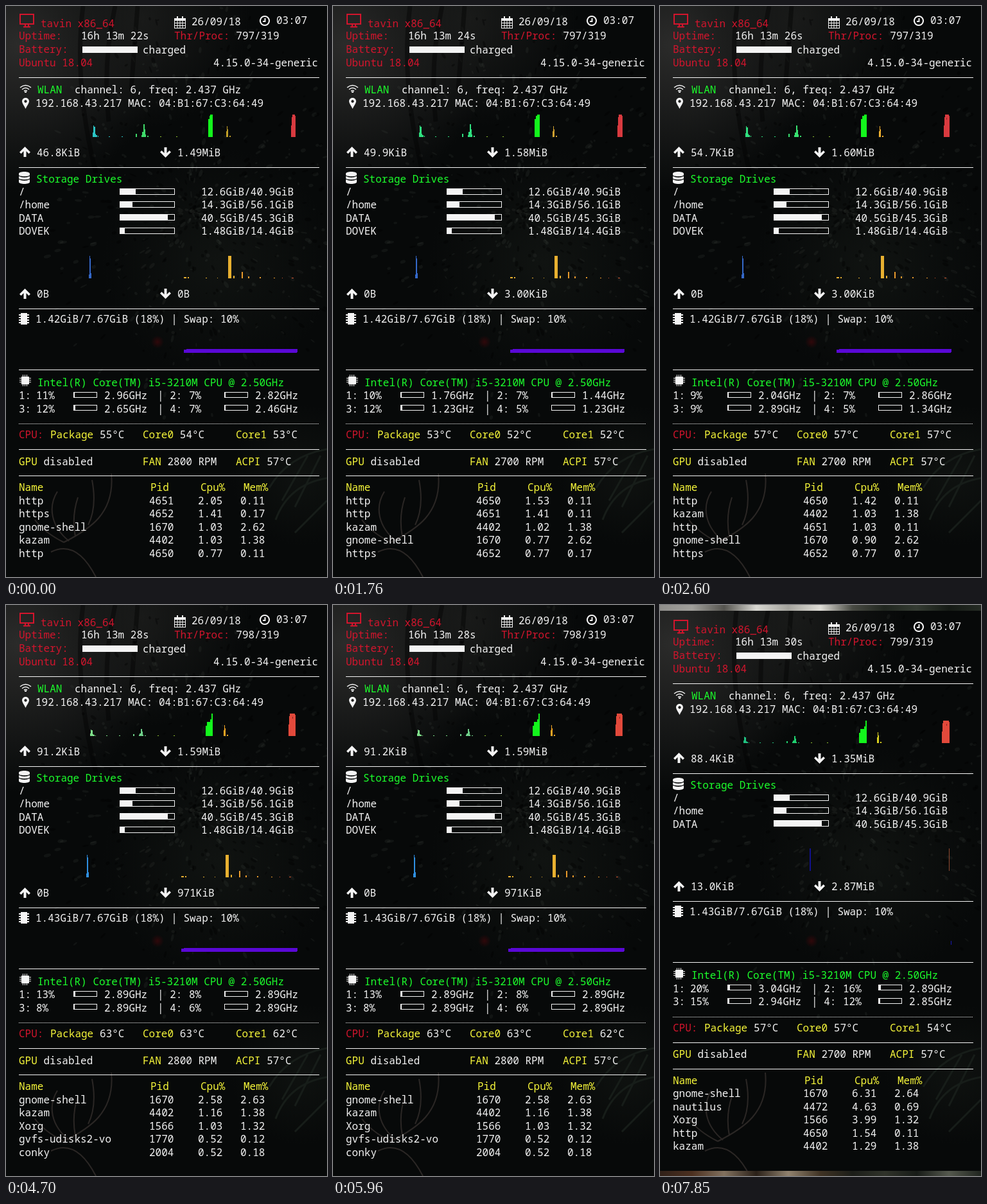
These frames come from a looping animation (500 px wide and 889 px high, 8000 ms). An HTML page with a canvas:

```html
<!DOCTYPE html>
<html lang="en">
<head>
<meta charset="utf-8">
<title>System monitor</title>
<style>
html, body { margin: 0; width: 100%; height: 100%; overflow: hidden; background: #080909; }
canvas { display: block; }
</style>
</head>
<body>
<canvas id="stage" width="500" height="889"></canvas>
<script>
const W = 500, H = 889, LOOP = 8000;
const WHITE = '#f4f4f4', RED = '#d3152d', GREEN = '#1cff2c', YELLOW = '#f7f73a';
const stage = document.getElementById('stage');
let c = stage.getContext('2d');
let shift = 0; // vertical offset of the current block

// cores: "load frequency"; temps: package, core 0, core 1
const states = [
  { at: 0, up: '16h 13m 22s', thr: '797/319', net: ['46.8KiB', '1.49MiB'], io: ['0B', '0B'], mem: '1.42',
    cores: ['11 2.96', '7 2.82', '12 2.65', '7 2.46'], temps: [55, 54, 53], fan: 2800,
    top: ['http 4651 2.05 0.11', 'https 4652 1.41 0.17', 'gnome-shell 1670 1.03 2.62', 'kazam 4402 1.03 1.38', 'http 4650 0.77 0.11'],
    hues: ['#2bc4c4', '#3fd96a', '#c2a028'], scale: 1 },
  { at: 500, up: '16h 13m 24s', thr: '797/319', net: ['49.9KiB', '1.58MiB'], io: ['0B', '3.00KiB'], mem: '1.42',
    cores: ['10 1.76', '7 1.44', '12 1.23', '5 1.23'], temps: [53, 52, 52], fan: 2700,
    top: ['http 4650 1.53 0.11', 'http 4651 1.41 0.11', 'kazam 4402 1.02 1.38', 'gnome-shell 1670 0.77 2.62', 'https 4652 0.77 0.17'],
    hues: ['#2fe07f', '#2fe07f', '#cfa030'], scale: 1 },
  { at: 2600, up: '16h 13m 26s', thr: '797/319', net: ['54.7KiB', '1.60MiB'], io: ['0B', '3.00KiB'], mem: '1.42',
    cores: ['9 2.04', '7 2.86', '9 2.89', '5 1.34'], temps: [57, 57, 57], fan: 2700,
    top: ['http 4650 1.42 0.11', 'kazam 4402 1.03 1.38', 'http 4651 1.03 0.11', 'gnome-shell 1670 0.90 2.62', 'https 4652 0.77 0.17'],
    hues: ['#2fe07f', '#38e070', '#eeb030'], scale: .92 },
  { at: 4700, up: '16h 13m 28s', thr: '798/319', net: ['91.2KiB', '1.59MiB'], io: ['0B', '971KiB'], mem: '1.43',
    cores: ['13 2.89', '8 2.89', '8 2.89', '6 2.89'], temps: [63, 63, 62], fan: 2800,
    top: ['gnome-shell 1670 2.58 2.63', 'kazam 4402 1.16 1.38', 'Xorg 1566 1.03 1.32', 'gvfs-udisks2-vo 1770 0.52 0.12', 'conky 2004 0.52 0.18'],
    hues: ['#7fe08a', '#6fd08a', '#f5a623'], scale: .55 },
  { at: 6800, up: '16h 13m 30s', thr: '799/319', net: ['88.4KiB', '1.35MiB'], io: ['13.0KiB', '2.87MiB'], mem: '1.43',
    cores: ['20 3.04', '16 2.89', '15 2.94', '12 2.85'], temps: [57, 57, 54], fan: 2700,
    top: ['gnome-shell 1670 6.31 2.64', 'nautilus 4472 4.63 0.69', 'Xorg 1566 3.99 1.32', 'http 4650 1.54 0.11', 'kazam 4402 1.29 1.38'],
    hues: ['#20c080', '#20d070', '#d8d020'], scale: .55, unmounted: true }
];
const drives = [['/', 25, '12.6GiB/40.9GiB'], ['/home', 20, '14.3GiB/56.1GiB'],
  ['DATA', 75, '40.5GiB/45.3GiB'], ['DOVEK', 8, '1.48GiB/14.4GiB']];

function rect(x, y, w, h, color = WHITE) {
  c.fillStyle = color;
  c.fillRect(x, Math.round(y + shift), w, h);
}
// y is the middle of the capitals
function text(s, x, y, color = WHITE) {
  c.fillStyle = color;
  c.fillText(s, x, Math.round(y + shift + 5.5));
}
function pair(label, value, x, y, color = YELLOW) {
  text(label, x, y, color);
  text(value, x + (label.length + 1) * 9.63, y);
}
function rule(y) { rect(20, y, 468, 1); }
function gauge(x, y, w, h, fill) {
  c.strokeStyle = WHITE;
  c.lineWidth = 1;
  c.strokeRect(x + .5, Math.round(y + shift) + .5, w - 1, h - 1);
  rect(x, y, fill, h);
}
function bars(list, base, color, dx = 0, scale = 1) {
  for (const [x, w, h] of list) {
    const tall = Math.max(1, Math.round(h * scale));
    rect(Math.round(x + dx), base - tall, w, tall, color);
  }
}
function icon(d, x, y, color = WHITE, line = 0) {
  c.save();
  c.translate(x, Math.round(y + shift));
  c.fillStyle = c.strokeStyle = color;
  c.lineWidth = line;
  const p = new Path2D(d);
  if (line) c.stroke(p); else c.fill(p, 'evenodd');
  c.restore();
}

const arrow = 'M8.5 0L17 8.5L14.5 11L10.5 7V16H6.5V7L2.5 11L0 8.5Z';
const arrowDown = 'M8.5 16L17 7.5L14.5 5L10.5 9V0H6.5V9L2.5 5L0 7.5Z';

function header(s) {
  icon('M1 1H22V16H1ZM9 16V20M14 16V20M6 20.5H17', 21, 12, RED, 2);
  text('tavin x86_64', 54, 27, RED);
  icon('M0 3H4V0H6V3H12V0H14V3H18V19H0ZM1 7V18H17V7Z', 262, 16);
  icon('M1 10.5H17M1 14.5H17M5 7V18M9 7V18M13 7V18', 262, 16, WHITE, 1);
  text('26/09/18', 289, 24);
  icon('M8 1A7 7 0 1 1 7.99 1M8.5 4V9H5', 395, 15, WHITE, 2);
  text('03:07', 421, 22);
  text('Uptime:', 20, 46, RED);
  text(s.up, 117, 46);
  pair('Thr/Proc:', s.thr, 262, 46, RED);
  text('Battery:', 20, 67, RED);
  rect(119, 63, 86, 10);
  text('charged', 213, 68);
  text('Ubuntu 18.04', 20, 88, RED);
  text('4.15.0-34-generic', 323, 88);
  rule(111);
}

function wlan(s, i) {
  icon('M1 5Q9.5 -2 18 5M4 8Q9.5 3 15 8M7 10.5Q9.5 8.5 12 10.5', 21, 122, WHITE, 1.5);
  rect(29, 133, 3, 2);
  text('WLAN', 49, 130, GREEN);
  text('channel: 6, freq: 2.437 GHz', 107, 130);
  icon('M5.5 0C9 0 11 2.5 11 5.5C11 8 7.5 13 5.5 17C3.5 13 0 8 0 5.5C0 2.5 2 0 5.5 0ZM5.5 3.3A2.2 2.2 0 1 0 5.51 3.3Z', 25, 143);
  text('192.168.43.217 MAC: 04:B1:67:C3:64:49', 46, 151);

  const dx = -1.25 * i, base = 204, [left, mid, late] = s.hues;
  bars([[135, 1, 7], [136, 1, 18], [137, 2, 16], [139, 1, 5], [140, 2, 3], [143, 1, 2], [160, 2, 1], [180, 2, 1]], base, left, dx, s.scale);
  bars([[202, 2, 5], [211, 1, 3], [212, 2, 8], [214, 2, 20], [216, 1, 12], [217, 1, 4], [220, 2, 2]], base, mid, dx, s.scale);
  bars([[240, 2, 1], [265, 2, 1]], base, '#8fbf30', dx);
  bars([[343, 1, 9], [344, 1, 17], [345, 1, 12], [348, 2, 2]], base, late, dx);

  // the newest samples grow leftwards from a fixed edge
  const edge = Math.round(315 + dx);
  const steps = i < 3 ? [28, 33, 35] : [16, 22, 35];
  bars([[edge, 2, steps[0]], [edge + 2, 316 - edge, steps[1]],
    [318, 2, i < 3 ? 35 : 26], [320, 2, steps[2]]], base, '#13f51c');
  const redEdge = Math.round(444 + dx);
  bars([[redEdge, 1, 18], [redEdge + 1, 1, 31], [redEdge + 2, 448 - redEdge, 35], [450, 1, 33]], base, i < 3 ? '#d83a3f' : '#e2493b');
  if (i > 1) bars([[446, 1, 3]], 177, '#8d2723');

  icon(arrow, 21, 219);
  text(s.net[0], 48, 228);
  icon(arrowDown, 240, 220);
  text(s.net[1], 267, 228);
  rule(251);
}

function storage(s) {
  icon('M0 3C0 -1 17 -1 17 3V5C17 8 0 8 0 5ZM0 7Q8.5 11 17 7V10C17 13 0 13 0 10ZM0 12Q8.5 16 17 12V16C17 20 0 20 0 16Z', 20, 258);
  text('Storage Drives', 47, 269, GREEN);
  drives.slice(0, s.unmounted ? 3 : 4).forEach(([name, fill, size], k) => {
    const y = 289.5 + 20.4 * k;
    text(name, 20, y);
    gauge(177, y - 6, 86, 10, fill);
    text(size, 304, y);
  });
}

function diskAndMemory(s, i) {
  const dx = -1.25 * i, base = 424;
  if (s.unmounted) {
    bars([[233, 2, 35]], base, '#11118c');
    bars([[450, 1, 35]], base, '#8e4930');
    rect(453, 533, 1, 6, '#1818b0');
  } else {
    bars([[129, 1, 6], [130, 1, 35], [131, 1, 31], [132, 1, 8]], base, i < 3 ? '#3468c8' : '#2f8fe0', dx);
    bars([[277, 4, 2], [283, 2, 2], [311, 2, 1], [329, 1, 1], [346, 5, 35], [354, 2, 4]], base, '#e8b030', dx);
    bars([[367, 2, 10], [377, 2, 3], [395, 2, 2], [417, 2, 1]], base, '#e89a2c', dx);
    bars([[430, 1, 1], [445, 3, 1]], base, '#d0552e', dx);
    const x = Math.round(277 + dx);
    rect(x, 535, 453 - x, 5, '#5a08d6');
    rect(x + 4, 534, 450 - x, 5, '#5a08d6');
  }
  icon(arrow, 21, 440);
  text(s.io[0], 48, 448);
  icon(arrowDown, 240, 440);
  text(s.io[1], 267, 448);
  rule(471);
  icon('M3 0H13V2H16V4H13V6H16V8H13V10H16V12H13V14H16V16H13V18H3V16H0V14H3V12H0V10H3V8H0V6H3V4H0V2H3Z', 20, 478);
  text(s.mem + 'GiB/7.67GiB (18%) | Swap: 10%', 46, 487);
  rule(566);
}

function processor(s) {
  icon('M3 3H5V0H6V3H8V0H9V3H11V0H12V3H15V5H18V6H15V8H18V9H15V11H18V12H15V15H12V18H11V15H9V18H8V15H6V18H5V15H3V12H0V11H3V9H0V8H3V6H0V5H3Z', 21, 574);
  text('Intel(R) Core(TM) i5-3210M CPU @ 2.50GHz', 49, 586, GREEN);
  s.cores.forEach((core, k) => {
    const [load, freq] = core.split(' ');
    const x = k % 2 * 235, y = 606.5 + 20.5 * (k >> 1);
    if (x) text('| ' + (k + 1) + ':', 236, y);
    else text(k + 1 + ':', 20, y);
    text(load + '%', 47 + x + (x && 3), y);
    gauge(105 + x, y - 6, 37, 9, Math.round(load * .22));
    text(freq + 'GHz', 153 + x, y);
  });
  for (let x = 20; x < 488; x += 2) rect(x, 650, 1, 1);
  text('CPU:', 20, 667.5, RED);
  ['Package', 'Core0', 'Core1'].forEach((name, k) =>
    pair(name, s.temps[k] + '°C', [69, 213, 358][k], 667.5));
  rule(690);
  pair('GPU', 'disabled', 20, 709);
  pair('FAN', s.fan + ' RPM', 213, 709);
  pair('ACPI', '57°C', 358, 709);
  rule(731);
  const heads = [20, 225, 303, 370], columns = [20, 223, 299, 365];
  ['Name', 'Pid', 'Cpu%', 'Mem%'].forEach((name, k) => text(name, heads[k], 749.5, YELLOW));
  s.top.forEach((row, r) => row.split(' ').forEach((cell, k) => text(cell, columns[k], 770 + 20.5 * r)));
}

// soft jungle backdrop, drawn once
function paintBackdrop() {
  const layer = document.createElement('canvas');
  layer.width = W;
  layer.height = H;
  const g = layer.getContext('2d');
  let seed = 7;
  const rnd = () => (seed = seed * 16807 % 2147483647) / 2147483647;
  const glow = (x, y, r, color) => {
    const grad = g.createRadialGradient(x, y, 0, x, y, r);
    grad.addColorStop(0, `rgba(${color},1)`);
    grad.addColorStop(1, `rgba(${color},0)`);
    g.fillStyle = grad;
    g.fillRect(0, 0, W, H);
  };
  g.fillStyle = '#070909';
  g.fillRect(0, 0, W, H);
  glow(20, 60, 230, '43,43,42');
  glow(210, 20, 170, '25,26,25');
  glow(330, 400, 180, '16,19,17');
  glow(460, 730, 110, '15,18,16');
  for (let k = 0; k < 700; k++) {
    const a = rnd() * 7, r = rnd();
    const x = 290 + Math.cos(a) * 240 * r, y = 320 + Math.sin(a) * 330 * r;
    g.fillStyle = rnd() < .5 ? 'rgba(0,0,0,.35)' : 'rgba(70,80,70,.17)';
    g.beginPath();
    g.ellipse(x, y, 1 + rnd() * 5, 1 + rnd() * 2, a, 0, 7);
    g.fill();
  }
  glow(236, 523, 10, '48,8,10');
  const strokes = (d, color, w) => {
    g.strokeStyle = color;
    g.lineWidth = w;
    g.stroke(new Path2D(d));
  };
  strokes('M120 0Q105 120 140 260M170 0Q150 90 160 180M205 0L195 130', 'rgba(0,0,0,.4)', 7);
  strokes('M90 835C130 815 170 790 164 728M128 808Q142 780 134 738M98 833C70 810 65 780 80 756M108 826Q102 795 112 765M90 835Q60 820 45 800M70 850Q110 830 140 889', '#2b2725', 2);
  strokes('M500 690Q440 700 410 750M500 735Q440 745 420 800M490 700L450 780M470 700L430 770M500 770L450 820', '#171d19', 3);
  return layer;
}

// bare strips of the wallpaper above and below the shortened panel
function strip(y, h, stops) {
  const grad = c.createLinearGradient(0, 0, W, 0);
  stops.forEach((color, k) => grad.addColorStop(k / (stops.length - 1), color));
  rect(0, y, W, h, grad);
}

const backdrop = paintBackdrop();
c.font = '16px "Noto Sans Mono", "DejaVu Sans Mono", monospace';

function draw() {
  const t = performance.now() % LOOP;
  const i = states.findLastIndex(s => t >= s.at), s = states[i];
  shift = 0;
  c.drawImage(backdrop, 0, 0);
  if (s.unmounted) {
    strip(0, 9, ['#8f8e8b', '#a09f9b', '#55544f', '#d8d7d2', '#a5a49e', '#dedcd6', '#484a43', '#20261f', '#343b32', '#151a15', '#252b24']);
    strip(881, 8, ['#302018', '#4c3020', '#83725f', '#2a2018', '#91826e', '#403324', '#1b1d18', '#30332a', '#171b17', '#55594e', '#20251f']);
  }
  shift = s.unmounted ? 11 : 0;
  header(s);
  wlan(s, i);
  storage(s);
  shift = s.unmounted ? -10 : 0;
  diskAndMemory(s, i);
  shift = s.unmounted ? -9.5 : 0;
  processor(s);
  requestAnimationFrame(draw);
}
requestAnimationFrame(draw);
</script>
</body>
</html>
```
